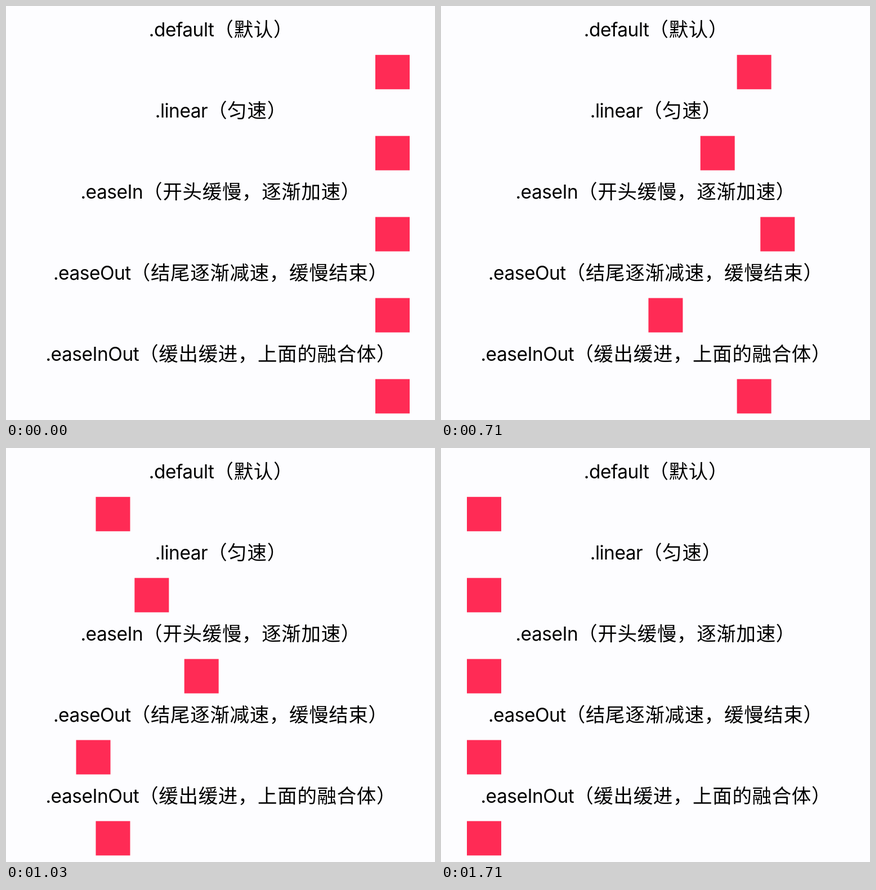
An HTML page that plays this animation: 762 by 735 pixels, repeating every 1.73 s.

```html
<!DOCTYPE html>
<html lang="zh-CN">
<head>
<meta charset="utf-8">
<title>Easing curves</title>
<style>
  html, body { margin: 0; width: 100%; height: 100%; overflow: hidden; background: #fdfdff; }
  svg { display: block; width: 762px; height: 735px; }
  rect { fill: #ff2b55; }
  .name {
    font: 400 33.5px Inter, sans-serif;
    font-optical-sizing: none;
    letter-spacing: -.5px;
    text-anchor: end;
  }
  .note {
    font: 400 34.5px "Noto Sans CJK SC", "Noto Sans CJK", sans-serif;
    letter-spacing: .65px;
  }
</style>
</head>
<body>
<svg viewBox="0 0 762 735" xmlns="http://www.w3.org/2000/svg"></svg>
<script>
const LOOP = 1730, START = 430;
const RIGHT = 656, LEFT = 46, SIZE = 61, PITCH = 143.9;

// Solves a CSS-style cubic-bezier(x1, 0 | y1, x2, 1) by bisection.
function bezier(x1, y1, x2, y2) {
  const at = (a, b, s) => 3 * a * s * (1 - s) ** 2 + 3 * b * s * s * (1 - s) + s ** 3;
  return p => {
    let lo = 0, hi = 1;
    for (let i = 0; i < 30; i++) {
      const mid = (lo + hi) / 2;
      if (at(x1, x2, mid) < p) lo = mid; else hi = mid;
    }
    return at(y1, y2, lo);
  };
}

const easeInOut = bezier(.42, 0, .58, 1);
const rows = [
  { name: '.default', note: '（默认）', x: 369.5, ease: easeInOut },
  { name: '.linear', note: '（匀速）', x: 358.2, ease: p => p },
  { name: '.easeIn', note: '（开头缓慢，逐渐加速）', x: 243.3, ease: bezier(.42, 0, 1, 1) },
  { name: '.easeOut', note: '（结尾逐渐减速，缓慢结束）', x: 221.8, ease: bezier(0, 0, .58, 1) },
  { name: '.easeInOut', note: '（缓出缓进，上面的融合体）', x: 236.2, ease: easeInOut }
];

const svg = document.querySelector('svg');
function add(tag, attrs, text = '') {
  const el = document.createElementNS(svg.namespaceURI, tag);
  for (const key in attrs) el.setAttribute(key, attrs[key]);
  el.textContent = text;
  return svg.appendChild(el);
}

rows.forEach((row, i) => {
  const y = 54 + i * PITCH;
  add('text', { class: 'name', x: row.x, y }, row.name);
  add('text', { class: 'note', x: row.x, y }, row.note);
  row.box = add('rect', { x: RIGHT, y: 86.8 + i * PITCH, width: SIZE, height: SIZE });
});

// Stuttering clock: steps are held for 20, 20 and 100 ms in turn.
function progress(t) {
  const u = t - START;
  if (u < 0) return 0;
  const step = 3 * Math.floor(u / 140) + Math.min(2, Math.floor(u % 140 / 20));
  return Math.min(1, .0344 + step / 21);
}

const begin = performance.now();
function draw() {
  const p = progress((performance.now() - begin) % LOOP);
  for (const { box, ease } of rows) {
    const eased = p === 0 || p === 1 ? p : ease(p);
    box.setAttribute('x', (RIGHT + (LEFT - RIGHT) * eased).toFixed(2));
  }
  requestAnimationFrame(draw);
}
draw();
</script>
</body>
</html>
```
